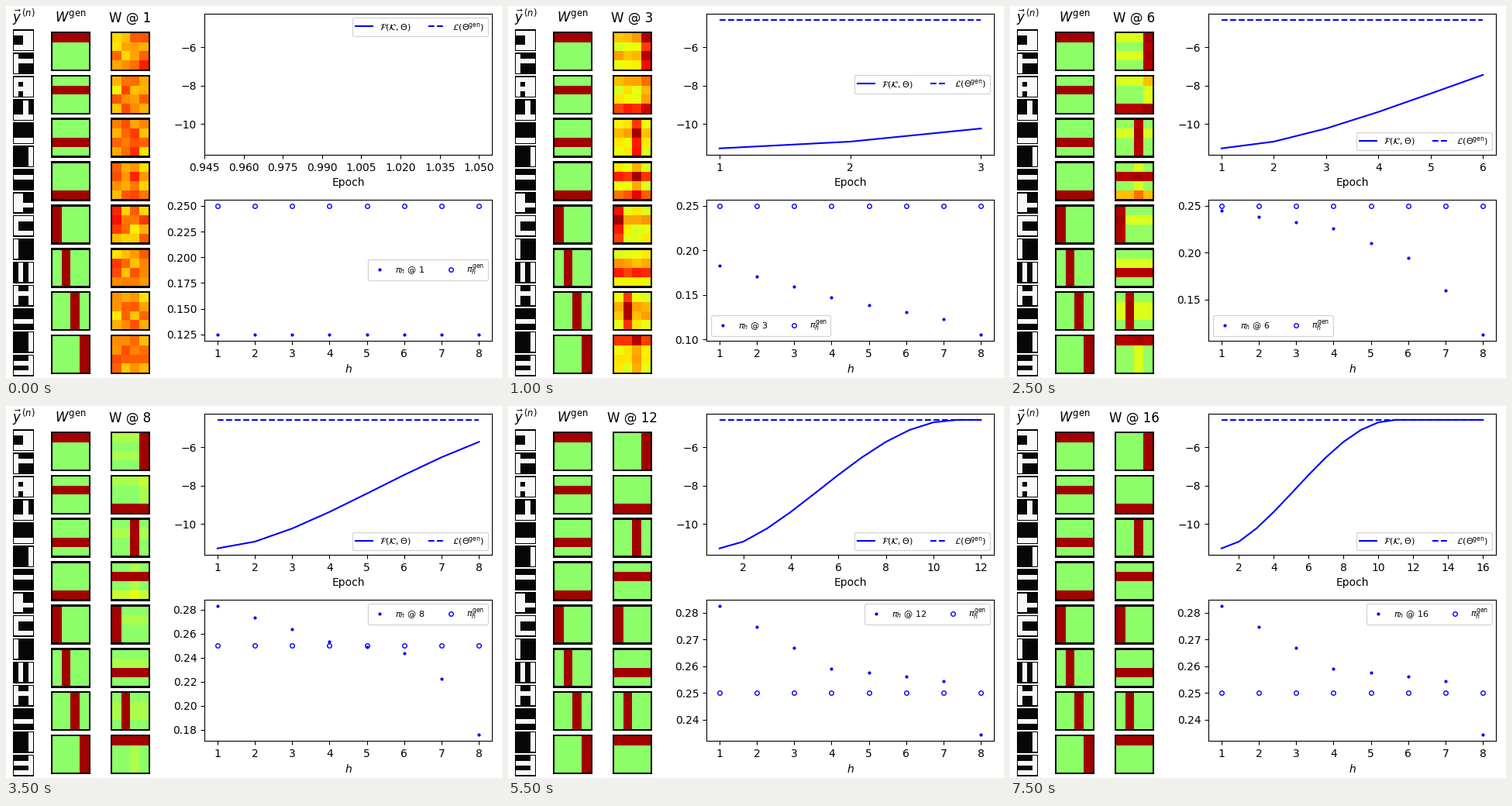
A matplotlib script for the animation above (8 s loop, 640 px wide and 480 px high).

```python
import numpy as np
import matplotlib.pyplot as plt
from matplotlib.animation import FuncAnimation
from matplotlib.ticker import MaxNLocator

EPOCHS = 16
TRUE_LL, START_LL = -4.58, -11.28

fig = plt.figure(figsize=(6.4, 4.8), dpi=100)


def bars(*ids):
    """4x4 grid with bars: ids 0-3 are rows, 4-7 are columns."""
    grid = np.zeros((4, 4))
    for i in ids:
        if i < 4:
            grid[i] = 1
        else:
            grid[:, i - 4] = 1
    return grid


# Bars shown in each data point
samples = [(0, 3, 6, 7), (1, 4), (0, 2, 4, 6, 7), (3, 6), (3,), (7,), (1,),
           (2, 4, 5), (0, 3, 4), (4,), (5, 7), (1, 4, 7), (2,), (7,), (1, 3, 7)]

# Bar each field settles on, and the bars that compete with it on the way
settled = (7, 3, 6, 1, 4, 2, 5, 0)
rivals = ((0, 2), (0, 7), (1,), (3, 3, 6), (1,), (1,), (1, 2), (6,))
main_bars = np.array([bars(i) for i in settled])
rival_bars = np.array([sum(bars(i) for i in ids) for ids in rivals])
noise = np.random.default_rng(3).uniform(-2.2, 2.2, (8, 4, 4))


def fields(t):
    def curve(*values):
        return np.interp(t, (1, 2, 4, 6, 8, 9), values)

    w = (curve(5, 4.3, 1, .1, 0, 0)
         + curve(1, 2.8, 7.5, 9.6, 10, 10) * main_bars
         + curve(.3, 1.2, 2.6, 2, .8, 0) * rival_bars
         + curve(1, .5, .15, 0, 0, 0) * noise)
    return np.clip(w, 0, 10)


def free_energy(t):
    u = np.clip((t - 1) / 10, 0, 1)
    return START_LL + (TRUE_LL - START_LL) * (1 - (1 - u**1.6)**2.12)


# Prior at a few units for some epochs, linear in between
KEY_UNITS = (1, 4, 6, 7, 8)
KEY_EPOCHS = (1, 2, 4, 6, 8, 10)
KEY_PRIORS = np.array([
    [.125] * 5,
    [.165, .138, .129, .1255, .1115],
    [.2, .1565, .132, .1195, .1],
    [.245, .226, .1945, .16, .113],
    [.283, .2535, .2437, .2225, .176],
    [.2826, .259, .2563, .2544, .2345],
])


def priors(t, units):
    anchors = [np.interp(t, KEY_EPOCHS, column) for column in KEY_PRIORS.T]
    return np.interp(units, KEY_UNITS, anchors)


def stack(grids, cmap, vmin, vmax):
    """Column of enlarged grids, each in a black box on white."""
    tiles = []
    for grid in grids:
        rgb = plt.get_cmap(cmap)((grid - vmin) / (vmax - vmin))[..., :3]
        rgb = rgb.repeat(20, axis=0).repeat(20, axis=1)
        rgb = np.pad(rgb, ((4, 4), (4, 4), (0, 0)))
        tiles.append(np.pad(rgb, ((8, 0), (8, 8), (0, 0)), constant_values=1))
    return np.pad(np.vstack(tiles), ((0, 8), (0, 0), (0, 0)), constant_values=1)


def heat(grids):
    return stack(grids, "jet", -11.83, 10.79)


def column(left, width, picture, title=""):
    ax = fig.add_axes([left, 0, width, .94])
    ax.axis("off")
    ax.set_title(title)
    return ax, ax.imshow(picture, interpolation="none")


column(0, .07, stack([bars(*ids) for ids in samples], "gray", -.03, 1.03),
       r"$\vec{y}^{\,(n)}$")
column(.08, .1, heat([10 * bars(i) for i in range(8)]), r"$W^{\mathrm{gen}}$")
ax_w, w_image = column(.2, .1, heat(fields(1)))
ax_f = fig.add_axes([.4, .6, .58, .38])
ax_pi = fig.add_axes([.4, .1, .58, .38])


def draw(frame):
    epoch = frame + 1
    ax_w.set_title(f"W @ {epoch}")
    w_image.set_data(heat(fields(epoch)))

    ax_f.clear()
    t = np.arange(1, epoch + 1)
    ax_f.plot(t, free_energy(t), "b-", label=r"$\mathcal{F}(\mathcal{K},\Theta)$")
    ax_f.plot(t, [TRUE_LL] * epoch, "b--", label=r"$\mathcal{L}(\Theta^{\mathrm{gen}})$")
    ax_f.xaxis.set_major_locator(MaxNLocator(integer=True))
    ax_f.set_xlabel("Epoch")
    ax_f.legend(ncol=2, fontsize=8)

    ax_pi.clear()
    h = np.arange(1, 9)
    ax_pi.plot(h, priors(epoch, h), "b.", ms=4, label=rf"$\pi_h$ @ {epoch}")
    ax_pi.plot(h, [.25] * 8, "bo", ms=4, mfc="none", label=r"$\pi_h^{\mathrm{gen}}$")
    ax_pi.set_xticks(h)
    ax_pi.set_xlabel("$h$")
    ax_pi.legend(ncol=2, fontsize=8)
    return []


anim = FuncAnimation(fig, draw, frames=EPOCHS, interval=500,
                     init_func=lambda: draw(0), repeat=True, repeat_delay=0)
plt.show()
```
